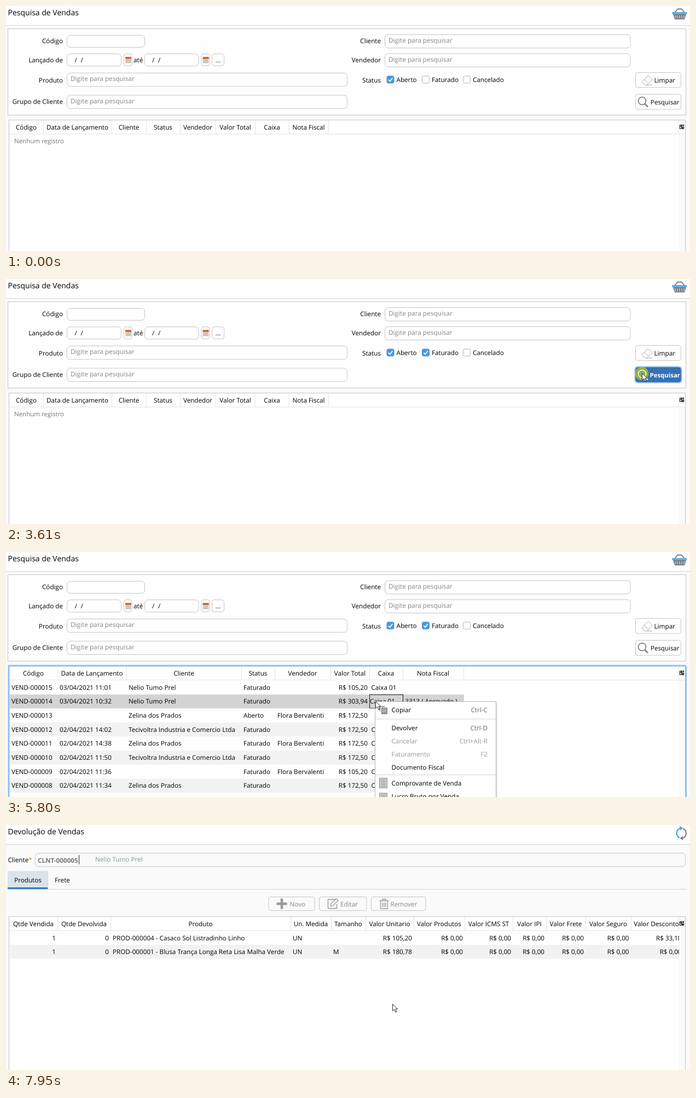
Recreate the animation shown at these times as an HTML page. Size 1250 by 448 pixels, loop 8000 ms.

```html
<!DOCTYPE html>
<html lang="pt-BR">
<head>
<meta charset="utf-8">
<title>Pesquisa de Vendas</title>
<style>
html, body { margin: 0; width: 100%; height: 100%; overflow: hidden; background: #fafafa; }
svg { display: block; width: 100vw; height: 100vh; font-family: "Open Sans", "Noto Sans", sans-serif; text-rendering: geometricPrecision; }
</style>
</head>
<body>
<svg id="stage" viewBox="0 0 1250 448"></svg>
<script>
const LOOP = 8000;
const SIZE = 11.7, INK = '#000', GREY = '#858585', EDGE = '#c4c4c4', BLUE = '#2675bf', RING = '#8fbfee';

// Drawing helpers
const text = (x, y, s, { fill = INK, anchor = 'start', size = SIZE, weight = 400 } = {}) =>
  `<text x="${x}" y="${y}" fill="${fill}" text-anchor="${anchor}" font-size="${size}" font-weight="${weight}">${s}</text>`;
const rect = (x, y, w, h, fill, stroke = 'none', r = 0, sw = 1) =>
  `<rect x="${x}" y="${y}" width="${w}" height="${h}" rx="${r}" fill="${fill}" stroke="${stroke}" stroke-width="${sw}"/>`;
const path = (d, stroke, sw = 1, fill = 'none') =>
  `<path d="${d}" fill="${fill}" stroke="${stroke}" stroke-width="${sw}"/>`;
const at = (x, y, body) => `<g transform="translate(${x} ${y})">${body}</g>`;
const end = { anchor: 'end' }, middle = { anchor: 'middle' };

const field = (x, y, w, h, hint = '') =>
  rect(x + .5, y + .5, w, h, '#fff', EDGE, 6) + text(x + 7, y + 15.2, hint, { fill: GREY, size: 11.8 });

function cursor([x, y]) {
  return at(x, y, path('M.5 .5V13L3.5 10.2L5.8 15.3L7.9 14.4L5.7 9.4H9.6Z', '#30282e', 1, '#fff'));
}

function calendar(x) {
  return rect(x + .5, 87.5, 15, 22, '#fff', EDGE, 4) +
    rect(x + 3, 93, 11, 12, '#ddd5d0') + rect(x + 3, 93, 11, 4, '#c9703c') +
    path(`M${x + 4} 99.5h9M${x + 4} 102.5h9`, '#aaa');
}

function checkbox(x, label, labelX, { on = false, hover = false, focus = false } = {}) {
  const ring = focus ? rect(x - 2, 125.5, 18, 18, RING, 'none', 4) : '';
  const fill = on ? (hover ? '#3d87d2' : '#4a98dc') : (hover ? '#f2f8fe' : '#fff');
  const edge = on ? (focus ? '#3578bd' : '#4a98dc') : (hover ? '#7eb0de' : '#b4b4b4');
  return ring + rect(x + .5, 128, 13, 13, fill, edge, 2.5) +
    (on ? path(`M${x + 3.4} 134.8l2.8 2.9l4.6 -6.2`, '#fff', 1.8) : '') + text(labelX, 139.4, label);
}

function cornerIcon(y) {
  return at(1231, y, path('M.5 .5H7.5V3M.5 .5V7.5H3.5M.5 2.8H7.5M3.5 .5V7.5', '#111', 1.2) +
    path('M3.6 5H8.6L6.1 8.6Z', '#111', .6, '#111'));
}

function header(top, edges, labels, centers) {
  let out = rect(5.5, top + .5, 1236, 460, '#fff', EDGE) + rect(1230, top + 26, 11, 440, '#fafafa') +
    path(`M6 ${top + 26}H1241`, '#e2e2e2');
  for (const x of [...edges, 1229]) out += path(`M${x + .5} ${top + 1}V${top + 25.5}`, '#e2e2e2');
  labels.forEach((s, i) => out += text(centers[i], top + 18.2, s, middle));
  return out + cornerIcon(top + 9);
}

const midpoints = edges => edges.map((x, i) => (x + (i ? edges[i - 1] : 6)) / 2);

function titleBar(title) {
  return rect(0, 0, 1250, 448, '#fafafa') + rect(0, 0, 1250, 35, '#fff') +
    path('M0 35.5H1250', '#d2d2d2') + text(3.5, 17, title, { size: 14 });
}

function basket() {
  let out = path('M1222 12L1227.5 5.5H1234.5L1240 12', '#77797d', 1.8) +
    path('M1219 15H1243L1240 24.5H1222Z', 'none', 0, '#7b7e84') + rect(1217, 11, 27.5, 4, '#62aee4', 'none', 1.5);
  for (let x = 1223; x < 1241; x += 4) out += path(`M${x} 17V22.5`, '#d8d8da', 1.2);
  return out;
}

// Search form
function limparButton() {
  return rect(1150.5, 121.5, 83, 27.5, '#fff', EDGE, 4) +
    path('M1162 138.5L1173.5 127L1181 134.5L1171 144.5H1167.5Z M1166.5 134L1174 141.5 M1171 144.5H1181', '#a8a8a8') +
    text(1184.5, 139.6, 'Limpar', { size: 11.8 });
}

function searchButton(mode) {
  const lens = color => `<circle cx="1162.5" cy="173.5" r="7" fill="none" stroke="${color}" stroke-width="1.6"/>` +
    path('M1167.5 179L1173 184.5', color, 2.4);
  if (mode === 'focus')
    return rect(1148.5, 159.5, 87, 31, RING, 'none', 6) + rect(1151, 162, 82, 26, '#3870b1', '#2f66a5', 4) +
      '<circle cx="1162" cy="173" r="12.3" fill="#b4c32c" fill-opacity=".76"/>' + lens('#f4f7e6') +
      text(1176.5, 179.8, 'Pesquisar', { fill: '#fff', weight: 700, size: 11.4 });
  const hover = mode === 'hover';
  return rect(1150.5, 161.5, 83, 27.5, hover ? '#f5f5f5' : '#fff', hover ? '#8fb6da' : EDGE, 4) + lens('#757575') +
    text(1178, 179.8, 'Pesquisar', { size: 11.5 });
}

function form(s) {
  const hint = 'Digite para pesquisar';
  const labels = [[104, 68.4, 'Código'], [104, 103.2, 'Lançado de'], [104, 139.6, 'Produto'], [104, 179.4, 'Grupo de Cliente'],
    [685, 68.4, 'Cliente'], [685, 103.2, 'Vendedor'], [685, 139.6, 'Status']];
  const slashes = x => text(x + 14.5, 103.4, '/') + text(x + 25.5, 103.4, '/');
  return rect(3.5, 41.5, 1239, 158, '#fefefe', EDGE) +
    labels.map(([x, y, t]) => text(x, y, t, end)).join('') +
    field(111, 53, 142, 22) + field(111, 87, 99, 22.5) + field(253, 87, 98.5, 22.5) +
    slashes(111) + slashes(252.5) + calendar(215) + calendar(356.5) + text(233, 103.2, 'até') +
    rect(376.5, 87.5, 22, 22, '#fff', EDGE, 4) + text(387.5, 103, '...', middle) +
    field(111, 122, 512, 24.5, hint) + field(111, 162.5, 512, 24.5, hint) +
    field(692, 51.8, 448.5, 24.5, hint) + field(692, 86.5, 448.5, 24.5, hint) +
    checkbox(695.5, 'Aberto', 713.5, { on: true }) +
    checkbox(760, 'Faturado', 778, s.check) +
    checkbox(835, 'Cancelado', 853) +
    limparButton() + searchButton(s.button);
}

// Sales list
const nelio = 'Nelio Tumo Prel', zelina = 'Zelina dos Prados', flora = 'Flora Bervalenti',
  firm = 'Tecivoltra Industria e Comercio Ltda';
const sales = [
  ['03/04/2021 11:01', nelio, '', '105,20', ''],
  ['03/04/2021 10:32', nelio, '', '303,94', '3313 ( Aprovado )'],
  ['', zelina, flora, '172,50', ''],
  ['02/04/2021 14:02', firm, '', '172,50', '3312 ( Rejeitado )'],
  ['02/04/2021 14:38', zelina, flora, '172,50', '3322 ( Aprovado )'],
  ['02/04/2021 11:50', firm, '', '172,50', '3311 ( Rejeitado )'],
  ['02/04/2021 11:36', '', flora, '105,20', '3321 ( Aprovado )'],
  ['02/04/2021 11:34', zelina, '', '172,50', '3320 ( Aprovado )']
];
const saleLabels = ['Código', 'Data de Lançamento', 'Cliente', 'Status', 'Vendedor', 'Valor Total', 'Caixa', 'Nota Fiscal'];

function saleRow([date, client, seller, value, invoice], i, s) {
  const top = 234.8 + i * 25.67, y = top + 16.9, chosen = i === s.selected, active = chosen && !s.dim;
  const style = { fill: active ? '#fff' : INK };
  const open = !date, boxed = chosen && i > 0;
  const back = active ? BLUE : chosen ? '#d3d3d3' : i % 2 ? '#f2f2f2' : '#fff';
  const cells = [[10, 'VEND-' + String(15 - i).padStart(6, '0')], [98, date], [224, client], [434, open ? 'Aberto' : 'Faturado'],
    [496, seller], [boxed ? 665 : 667.5, open ? '' : 'Caixa 01'], [729.5, invoice]];
  return rect(7, top, 830, 25.67, back) + cells.map(([x, t]) => text(x, y, t, style)).join('') +
    text(661, y, 'R$ ' + value, { ...style, ...end }) +
    (boxed ? rect(664.5, 260.9, 61, 25, 'none', '#111') : '');
}

function salesTable(s) {
  if (s.selected === undefined) {
    const edges = [68, 193, 256, 318, 383, 455, 517, 589];
    return header(208, edges, saleLabels, midpoints(edges)) + text(15, 251.3, 'Nenhum registro', { fill: '#757575', size: 11.5 });
  }
  const edges = [94, 220, 430, 491, 593, 664, 725, 836];
  return header(208, edges, saleLabels, midpoints(edges)) +
    sales.map((row, i) => saleRow(row, i, s)).join('') + text(661, 457, 'R$ 172,50', end) +
    (s.tableFocus ? rect(5, 208, 1237.5, 460, 'none', RING, 1, 3) : '');
}

function reportIcon(y) {
  let out = rect(682.5, y, 14, 18, '#d5d5d5', '#8a8a8a');
  for (let k = 3; k < 17; k += 3) out += path(`M684.5 ${y + k}h10`, '#8a8a8a');
  return out;
}

function menu(hover) {
  const items = [['Copiar', 'Ctrl-C', 293], ['Devolver', 'Ctrl-D', 326.3], ['Cancelar', 'Ctrl+Alt-R', 350.3], ['Faturamento', 'F2', 374.3],
    ['Documento Fiscal', '', 398.3], ['Comprovante de Venda', '', 427], ['Lucro Bruto por Venda', '', 451]];
  let out = rect(677, 276, 221, 190, 'rgba(0,0,0,.1)', 'none', 2) +
    rect(674.5, 273.5, 221, 190, '#fff', '#b4b4b4') +
    path('M675 305.5H895M675 407.5H895', '#d4d4d4') +
    path('M683.5 291V282.5H692', '#777', 1.6) + rect(687, 285.5, 9, 10, '#d0d0d0', '#686868', 0, 1.6) +
    path('M689 288.5h5M689 291h5M689 293.5h5', '#686868') + reportIcon(413.5) + reportIcon(441);
  for (const [label, key, y] of items) {
    const lit = hover && label === 'Devolver', off = label === 'Cancelar' || label === 'Faturamento';
    if (lit) out += rect(675, 310, 220, 24, BLUE);
    out += text(704.5, y, label, { fill: lit ? '#fff' : off ? '#999' : INK }) +
      text(880, y, key, { fill: lit ? '#fff' : off ? '#999' : '#666', ...end });
  }
  return out;
}

function spinner() {
  let out = '';
  for (let k = 0; k < 12; k++) {
    const p = k / 11, mix = (a, b) => Math.round(a + (b - a) * p);
    out += `<g transform="rotate(${180 - k * 30})">` +
      path('M7.5 0H13', `rgb(${mix(40, 222)},${mix(88, 226)},${mix(146, 232)})`, 3) + '</g>';
  }
  return at(623, 340, out);
}

function searchScreen(s) {
  return titleBar('Pesquisa de Vendas') + basket() + form(s) + salesTable(s) +
    (s.menu ? menu(s.menu === 'hover') : '') + (s.busy ? spinner() : '');
}

// Returns form
function returnsScreen() {
  const edges = [94, 191, 520, 594, 657, 745, 838, 926, 987, 1059, 1142];
  const labels = ['Qtde Vendida', 'Qtde Devolvida', 'Produto', 'Un. Medida', 'Tamanho', 'Valor Unitario', 'Valor Produtos',
    'Valor ICMS ST', 'Valor IPI', 'Valor Frete', 'Valor Seguro', 'Valor Desconto'];
  const row = (y, product, size, price, discount) =>
    text(91, y, '1', end) + text(188, y, '0', end) + text(195, y, product) + text(524, y, 'UN') + text(598, y, size) +
    [742, 835, 923, 984, 1056, 1138.5, 1234.5].map((x, i) =>
      text(x, y, 'R$ ' + (i === 0 ? price : i === 6 ? discount : '0,00'), end)).join('');
  const button = (x, w, label, labelX) => rect(x + .5, 131.5, w, 25, '#fafafa', EDGE, 4) + text(labelX, 148.5, label, { fill: GREY });
  return titleBar('Devolução de Vendas') +
    path('M1231 23.5A9.5 9.5 0 0 1 1232 6', '#4aa3e0', 2.2) + path('M1231 2L1237 5.5L1232 10Z', 'none', 0, '#4aa3e0') +
    path('M1237.5 6.5A9.5 9.5 0 0 1 1236.5 24', '#7d8084', 2.2) + path('M1237.5 28L1231.5 24.5L1236.5 20Z', 'none', 0, '#7d8084') +
    text(3.5, 67.5, 'Cliente<tspan fill="#d08a2e">*</tspan>') + rect(53.5, 51.5, 1188, 24.5, '#fafafa', EDGE, 6) +
    text(58, 69, 'CLNT-000005', { fill: '#777', weight: 700 }) + path('M133.5 55V72', '#222') +
    text(163, 66.5, nelio, { fill: '#7f9a8c' }) +
    path('M3 117.5H1244', '#d2d2d2') + rect(3, 84, 73.5, 33, '#dae4ed') + rect(3, 114, 73.5, 3.2, '#3080c9') +
    path('M76.5 87V113', '#d2d2d2') + text(40, 104.7, 'Produtos', middle) + text(89, 104.7, 'Frete') +
    button(479.5, 84, 'Novo', 518.5) + button(572, 86.5, 'Editar', 611) + button(667, 99.5, 'Remover', 702.5) +
    path('M504 134.5V153.5M494.5 144H513.5', '#999', 4.5) +
    path('M602 136H588.5V152.5H604.5V144', '#999', 1.3) + path('M593 148.5L594.2 143.5L603.5 134.5L607 138L597.8 147.2Z', '#999', 1.2) +
    path('M682.5 138.5H699M688 138V135.5H694V138M684.5 139V153H697.5V139M688 142V150M691 142V150M694 142V150', '#999', 1.3) +
    header(167, edges, labels, midpoints([...edges, 1235])) + rect(7, 219, 1223, 25.7, '#f2f2f2') +
    row(210.6, 'PROD-000004 - Casaco Sol Listradinho Linho', '', '105,20', '33,10') +
    row(236.2, 'PROD-000001 - Blusa Trança Longa Reta Lisa Malha Verde', 'M', '180,78', '0,00') +
    rect(1230, 168, 11, 280, '#fafafa') + cornerIcon(176);
}

// Timeline
const on = { on: true };
const steps = [
  { from: 0 },
  { from: 710, pointer: [800, 137], check: { hover: true } },
  { from: 1440, pointer: [800, 137], check: { on: true, hover: true, focus: true } },
  { from: 2170, pointer: [1076, 179], check: { on: true, focus: true } },
  { from: 2900, pointer: [1162, 172], check: { on: true, focus: true }, button: 'hover' },
  { from: 3610, pointer: [1162, 172], check: on, button: 'focus' },
  { from: 4360, pointer: [989, 237], check: on, selected: 0, tableFocus: true },
  { from: 5090, pointer: [676, 278], check: on, selected: 1, tableFocus: true },
  { from: 5800, pointer: [675, 273], check: on, selected: 1, tableFocus: true, dim: true, menu: 'open' },
  { from: 6510, pointer: [706, 327], check: on, selected: 1, tableFocus: true, dim: true, menu: 'hover' },
  { from: 7240, pointer: [706, 327], check: on, selected: 1, dim: true, busy: true },
  { from: 7950, pointer: [706, 327], returns: true }
];

const stage = document.getElementById('stage');
let shown, start;

function render(t) {
  const step = steps.findLast(s => s.from <= t);
  if (step === shown) return;
  shown = step;
  stage.innerHTML = (step.returns ? returnsScreen() : searchScreen(step)) + (step.pointer ? cursor(step.pointer) : '');
}

function tick(now) {
  start ??= now;
  render(Math.max(0, now - start) % LOOP);
  requestAnimationFrame(tick);
}
render(0);
requestAnimationFrame(tick);
</script>
</body>
</html>
```
